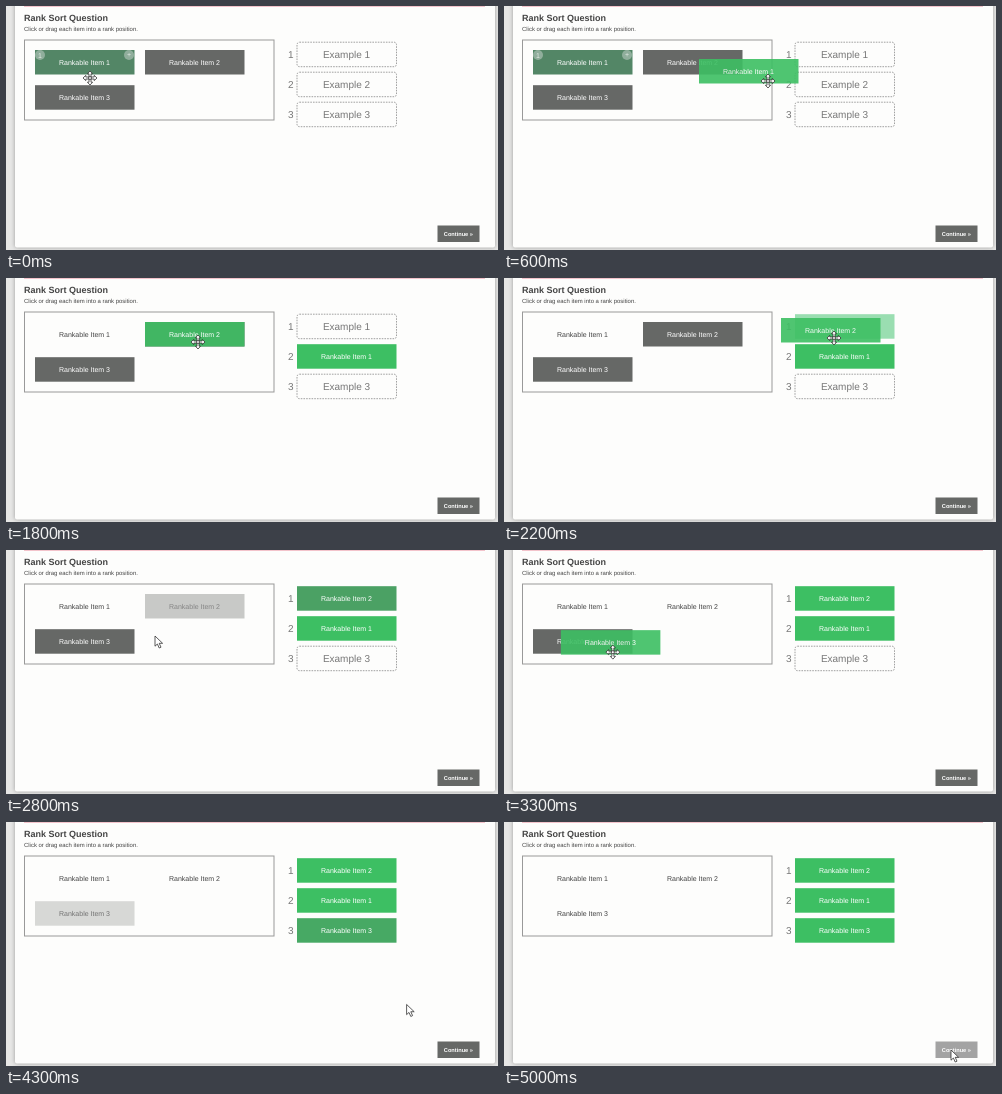
Animation of 492 by 244 pixels, one loop 5.1 s. Source, as an HTML page:

```html
<!DOCTYPE html>
<html lang="en">
<head>
<meta charset="utf-8">
<title>Rank sort</title>
<style>
  html, body { margin: 0; width: 100%; height: 100%; overflow: hidden; background: #e7e7e6; }
  svg { display: block; width: 492px; height: 244px; }
  text { font-family: Arial, "Liberation Sans", sans-serif; text-rendering: geometricPrecision; }
  .panel { fill: #fdfdfc; filter: drop-shadow(0 0 2px #0005); }
  .title { font-size: 9px; font-weight: bold; fill: #444; }
  .hint { font-size: 5.95px; fill: #444; }
  .label { font-size: 7px; fill: #fff; text-anchor: middle; }
  .big { font-size: 10px; fill: #777; text-anchor: middle; }
  .frame { fill: none; stroke: #999; }
  .slot { fill: none; stroke: #8a8a8a; stroke-width: .8; stroke-dasharray: 1.6 1.1; }
  .button { font-size: 5.65px; font-weight: bold; fill: #fff; text-anchor: middle; }
  .badge circle { fill: #b9c9bf; fill-opacity: .6; }
  .badge text { font-size: 7px; fill: #e4ece6; text-anchor: middle; }
  .cursor { fill: #fff; stroke: #333; stroke-width: .8; stroke-linejoin: round; }
</style>
</head>
<body>
<svg viewBox="0 0 492 244">
  <rect class="panel" x="9" y="-6" width="480" height="247.5" rx="2"/>
  <path d="M18 .5H479" stroke="#f3c3cb"/>
  <text class="title" x="18" y="14.8">Rank Sort Question</text>
  <text class="hint" x="18" y="24.9">Click or drag each item into a rank position.</text>
  <rect class="frame" x="18.5" y="34" width="249.5" height="80"/>
  <g id="board"></g>
  <g id="badges" class="badge">
    <circle cx="34" cy="49" r="5"/><text x="34" y="51.5">1</text>
    <circle cx="123" cy="49" r="5"/><text x="123" y="51.4">+</text>
  </g>
  <rect id="button" x="431.5" y="219.5" width="42" height="16.5"/>
  <text class="button" x="452.4" y="229.7">Continue »</text>
  <g id="drag"></g>
  <g class="cursor">
    <path id="arrow" d="M0 0V10.2L2.4 8L4.2 12L6 11.2L4.2 7.3H7.6Z"/>
    <g id="move">
      <path d="M0-7L2.6-4.2H1V-1H4.2V-2.6L7 0L4.2 2.6V1H1V4.2H2.6L0 7L-2.6 4.2H-1V1H-4.2V2.6L-7 0L-4.2-2.6V-1H-1V-4.2H-2.6Z"/>
      <circle r="1.5"/>
    </g>
  </g>
</svg>
<script>
const LOOP = 5100, STEP = 100, W = 99.5, H = 24.5;
const GREY = [102, 104, 102], GREEN = [61, 191, 99], WHITE = [255, 255, 255], INK = [68, 68, 68];
const $ = id => document.getElementById(id);

// Time, x and y of the pointer.
const track = [
  [0, 84, 72], [200, 98, 66], [600, 264, 75], [900, 334, 82], [1100, 334, 82],
  [1300, 309, 58], [1700, 192, 64], [1800, 192, 64], [2200, 330, 60], [2400, 336, 59],
  [2500, 330, 60], [2800, 149, 86], [3100, 81, 101], [3200, 81, 101], [3700, 349, 112],
  [3900, 351, 114], [4200, 392, 174], [4600, 447, 228], [5100, 447, 228]
];

// One drag per item; dx and dy are where the pointer holds it.
const drags = [
  { x: 29, y: 44, slot: 1, grab: 200, over: 700, drop: 1100, fade: 1260, dx: 69, dy: 22 },
  { x: 139, y: 44, slot: 0, grab: 1800, over: 2100, drop: 2400, fade: 2540, dx: 53, dy: 20 },
  { x: 29, y: 79.2, slot: 2, grab: 3200, over: 3600, drop: 3900, fade: 4000, dx: 52, dy: 22 }
];

function add(parent, tag, attrs, content = "") {
  const el = document.createElementNS("http://www.w3.org/2000/svg", tag);
  for (const key in attrs) el.setAttribute(key, attrs[key]);
  el.textContent = content;
  return parent.appendChild(el);
}

function makeTile(parent, x, y, name) {
  const g = add(parent, "g", { transform: `translate(${x} ${y})` });
  return {
    g,
    box: add(g, "rect", { width: W, height: H }),
    text: add(g, "text", { class: "label", x: 49.5, y: 14.5 }, name)
  };
}

const slots = [0, 1, 2].map(i => {
  const y = 36.2 + i * 30;
  add($("board"), "text", { class: "big", x: 284.8, y: y + 15.8 }, i + 1);
  const empty = add($("board"), "g", {});
  add(empty, "rect", { class: "slot", x: 291, y, width: W, height: H, rx: 2.5 });
  add(empty, "text", { class: "big", x: 340.5, y: y + 16 }, `Example ${i + 1}`);
  const glow = add($("board"), "rect", { x: 291, y, width: W, height: H, fill: "#9adeb1" });
  return { y, empty, glow };
});

drags.forEach((d, i) => {
  const name = `Rankable Item ${i + 1}`;
  d.home = makeTile($("board"), d.x, d.y, name);
  d.placed = makeTile($("board"), 291, slots[d.slot].y, name);
  d.ghost = makeTile($("drag"), 0, 0, name);
  d.ghost.box.setAttribute("fill", rgb(GREEN));
  d.ghost.g.setAttribute("opacity", .9);
});

function rgb(c) { return `rgb(${c.map(Math.round)})`; }
function mix(a, b, p) { return rgb(a.map((v, i) => v + (b[i] - v) * p)); }
function ramp(t, start, length) { return Math.min(1, Math.max(0, (t - start) / length)); }
function show(el, on) { el.style.display = on ? "" : "none"; }
function place(el, x, y) { el.setAttribute("transform", `translate(${x} ${y})`); }

function pointer(t) {
  const i = track.findIndex(k => k[0] > t);
  const [t0, x0, y0] = track[i - 1], [t1, x1, y1] = track[i];
  const u = (t - t0) / (t1 - t0), p = u * u * (3 - 2 * u);
  return [x0 + (x1 - x0) * p, y0 + (y1 - y0) * p];
}

function draw(t) {
  const [x, y] = pointer(t);
  let moving = t < 200;

  drags.forEach((d, i) => {
    const held = t >= d.grab && t < d.drop, dropped = t >= d.drop;
    const p = ramp(t, d.fade, 400), slot = slots[d.slot];
    const base = i === 0 && !dropped ? [83, 134, 102] : GREY;
    moving = moving || t >= d.grab - 100 && t < d.drop;
    d.home.box.setAttribute("fill", rgb(base));
    d.home.box.setAttribute("opacity", 1 - p);
    d.home.text.style.fill = mix(WHITE, INK, p);
    d.placed.box.setAttribute("fill", mix(GREY, GREEN, p));
    show(d.placed.g, dropped);
    show(d.ghost.g, held);
    place(d.ghost.g, x - d.dx, y - d.dy);
    show(slot.glow, held && t >= d.over);
    show(slot.empty, t < d.over);
  });

  show($("badges"), t < drags[0].drop);
  $("button").setAttribute("fill", mix(GREY, [163, 163, 163], ramp(t, 4500, 300)));
  show($("move"), moving);
  show($("arrow"), !moving);
  place($("move"), x, y);
  place($("arrow"), x, y);
}

const start = performance.now();
function tick() {
  const t = (performance.now() - start) % LOOP;
  draw(Math.floor(t / STEP) * STEP);
  requestAnimationFrame(tick);
}
tick();
</script>
</body>
</html>
```
